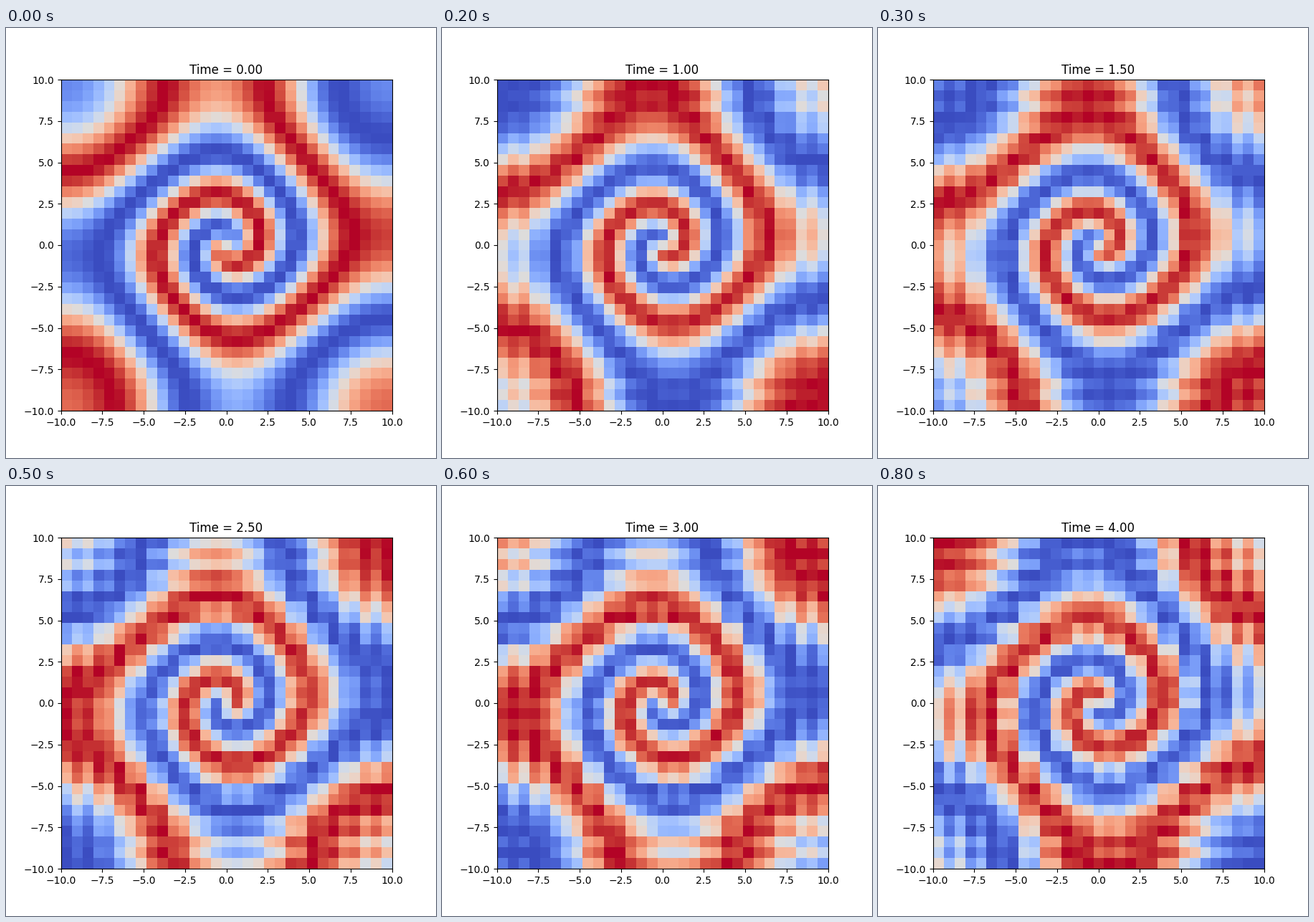
Animation, 600 px wide and 600 px high, one loop 900 ms. Source, as a matplotlib script:

```python
import numpy as np
import matplotlib.pyplot as plt
from matplotlib.animation import FuncAnimation

N = 30          # Chebyshev intervals per side
HALF = 10.0     # half width of the domain
BETA = 1.0
DIFF = 0.1
T_STEP = 0.5    # time between frames
FRAMES = 9
SUBSTEPS = 100


def cheb(n):
    """Chebyshev differentiation matrix and nodes."""
    j = np.arange(n + 1)
    x = np.cos(np.pi * j / n)
    c = np.where((j == 0) | (j == n), 2.0, 1.0) * (-1.0) ** j
    dx = x[:, None] - x[None, :]
    d = np.outer(c, 1 / c) / (dx + np.eye(n + 1))
    d -= np.diag(d.sum(axis=1))
    return d, x


# No-flux boundary: first derivative vanishes at both ends
D, nodes = cheb(N)
D[0] = D[-1] = 0
DXX = D @ D / HALF**2

X, Y = np.meshgrid(HALF * nodes, HALF * nodes)


def rate(z):
    """Lambda-omega reaction-diffusion for z = u + iv."""
    a2 = np.abs(z) ** 2
    lap = DXX @ z + z @ DXX.T
    return (1 - a2 - 1j * BETA * a2) * z + DIFF * lap


def rk4(z, h):
    k1 = rate(z)
    k2 = rate(z + h / 2 * k1)
    k3 = rate(z + h / 2 * k2)
    k4 = rate(z + h * k3)
    return z + h / 6 * (k1 + 2 * k2 + 2 * k3 + k4)


def solve():
    r = np.hypot(X, Y)
    z = np.tanh(r) * np.exp(1j * (np.arctan2(Y, X) - r))
    states = [z.real]
    for _ in range(FRAMES - 1):
        for _ in range(SUBSTEPS):
            z = rk4(z, T_STEP / SUBSTEPS)
        states.append(z.real)
    return states


states = solve()

fig, ax = plt.subplots(figsize=(6, 6), dpi=100)
image = ax.imshow(states[0], extent=[-HALF, HALF, -HALF, HALF],
                  origin="lower", cmap="coolwarm", vmin=-1, vmax=1,
                  interpolation="nearest")
title = ax.set_title("Time = 0.00")


def update(i):
    image.set_data(states[i])
    title.set_text(f"Time = {i * T_STEP:.2f}")
    return image, title


anim = FuncAnimation(fig, update, frames=FRAMES, interval=100,
                     repeat=True, repeat_delay=0)
plt.show()
```
